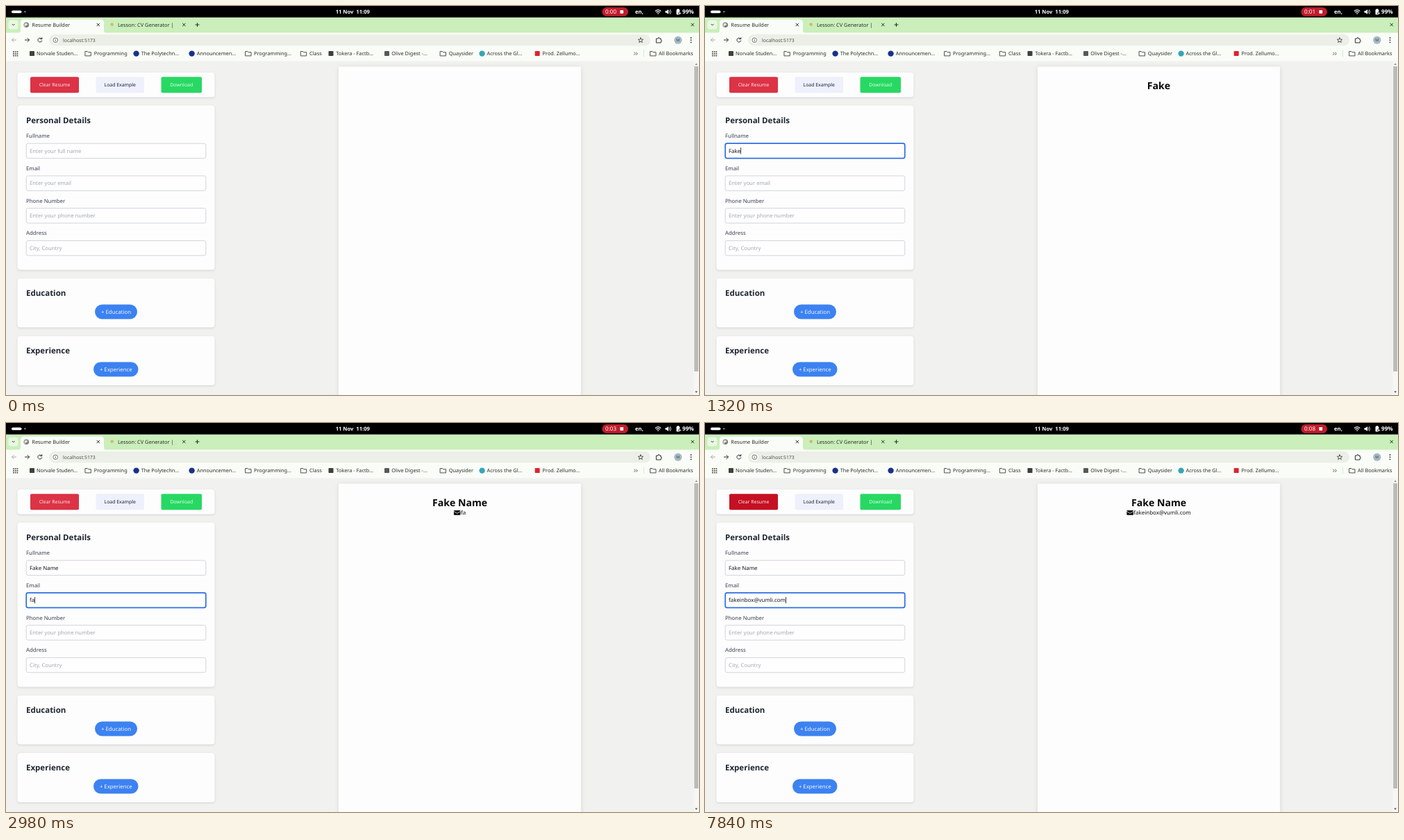
Write an HTML page that moves like this. It is 998 px wide and 561 px high and loops after 8 s.

```html
<!DOCTYPE html>
<html lang="en">
<head>
<meta charset="utf-8">
<title>Resume Builder</title>
<style>
  html, body { margin: 0; width: 100%; height: 100%; overflow: hidden; background: #f1f2f0; }
  svg { display: block; width: 998px; height: 561px; }
  text { font-family: "Noto Sans", sans-serif; white-space: pre; text-rendering: geometricPrecision; }
  .card { filter: drop-shadow(0 1.5px 1.5px rgba(0, 0, 0, .13)); }
  .paper { filter: drop-shadow(0 1px 3px rgba(0, 0, 0, .1)); }
  .line { fill: none; stroke-linecap: round; stroke-linejoin: round; }
</style>
</head>
<body>
<svg id="stage" viewBox="0 0 998 561" xmlns="http://www.w3.org/2000/svg"></svg>
<script>
const LOOP = 8000, BLINK = 600;
const INK = '#2b2f2a', MID = 653.5, FIELD_X = 34;

// ---- markup helpers ----
const rect = (x, y, w, h, fill, r = 0, more = '') =>
  `<rect x="${x}" y="${y}" width="${w}" height="${h}" rx="${r}" fill="${fill}" ${more}/>`;
const dot = (x, y, r, fill, more = '') => `<circle cx="${x}" cy="${y}" r="${r}" fill="${fill}" ${more}/>`;
const ring = (x, y, r, color, w = .9) => dot(x, y, r, 'none', `stroke="${color}" stroke-width="${w}"`);
const path = (d, color = INK, w = 1) => `<path class="line" d="${d}" stroke="${color}" stroke-width="${w}"/>`;
const shape = (d, fill) => `<path d="${d}" fill="${fill}"/>`;
const text = (x, y, size, str, fill = INK, more = '') =>
  `<text x="${x}" y="${y}" font-size="${size}" fill="${fill}" ${more}>${str}</text>`;
const BOLD = 'font-weight="700"', CENTER = 'text-anchor="middle"';
const cross = (x, y, r = 1.9) => path(`M${x - r} ${y - r}l${2 * r} ${2 * r}m0 ${-2 * r}l${-2 * r} ${2 * r}`);
const folder = (x, y = 68.5) => path(`M${x - 4} ${y - 3}h3l1 1.2h4v5.2h-8z`, '#454943', .95);

function systemBar() {
  return rect(0, 0, 998, 16.5, '#000') +
    rect(8, 6.5, 14.5, 3.7, '#fff', 1.85) + dot(27.3, 8.3, 1.3, '#777') +
    text(499.3, 11.2, 7.6, '11 Nov\u00a0 11:09', '#fff', `${BOLD} ${CENTER}`) +
    rect(858.5, 2, 37.5, 12.8, '#c01c2c', 6.4) +
    text(863, 11.2, 8.1, '0:00', '#fff', 'id="timer"') +
    rect(884.4, 6, 4.7, 4.7, '#fff', .5) +
    text(906, 11, 7.8, 'en,', '#fff', BOLD) +
    path('M935.3 7.2q3.8-3 7.6 0M936.9 9q2.2-1.7 4.4 0', '#fff', 1.2) + dot(939.1, 10.8, .9, '#fff') +
    shape('M949.5 7h2l2.3-2.2v7.2l-2.3-2.2h-2z', '#fff') +
    path('M955 6.8q1.1 1.6 0 3.2M956.6 5.4q2.2 3 0 6', '#fff', .9) +
    rect(965.5, 5, 4.8, 7.4, '#fff', .8) + rect(966.8, 4, 2.2, 1.2, '#fff') +
    path('M969 10.5h3M970.5 9v3', '#000', 1.8) + path('M969.2 10.5h2.6M970.5 9.2v2.6', '#fff', .8) +
    text(974, 11.2, 8.1, '99%', '#fff', BOLD);
}

function tabStrip() {
  return rect(0, 16.5, 998, 23, '#caefbb') +
    rect(3.5, 20.5, 14, 13, '#e9f8e2', 3.5) +
    path('M9 26.3l1.6 1.6 1.6-1.6') +
    shape('M17 39q4 0 4-4V24q0-4.500 4.500-4.500H136.500q4.500 0 4.500 4.500v11q0 4 4 4z', '#fafdf7') +
    dot(29.3, 27.2, 3.8, '#7b8079') +
    shape('M26.500 26q2-2 3.500-1t1 2-2 1-1 2q-2-1-1.500-4z', '#dfe3dc') +
    text(37.3, 29.8, 7.4, 'Resume Builder') + cross(132.8, 27) +
    dot(152.7, 26.6, 2.3, '#d8b56e') +
    text(161, 29.8, 7.4, 'Lesson: CV Generator |') + cross(256.3, 27) +
    path('M273 27h5M275.500 24.500v5', INK, 1.1) + cross(988.7, 27);
}

function toolbar() {
  const grid = [0, 1, 2].map(i => [0, 1, 2].map(j =>
    rect(10 + i * 2.8, 65.2 + j * 2.8, 1.7, 1.7, '#454943')).join('')).join('');
  return rect(0, 38.5, 998, 41, '#fafcf7') +
    path('M14.500 49h-6m2.600-2.600L8.500 49l2.600 2.600', '#a9ada6') +
    path('M27.500 49h6m-2.600-2.600l2.600 2.600-2.600 2.600') +
    path('M51.300 47.200a3 3 0 1 0 .5 2.700M51.800 45.600v2h-2') +
    rect(62, 41, 866, 16.3, '#ecefe7', 8.15) + dot(71.3, 49.2, 5.5, '#fafcf7') +
    ring(71.3, 49.2, 3.4, '#50544e', .8) + path('M71.300 49v1.800M71.300 47.300v.1', '#50544e', .8) +
    text(82, 51.9, 6.9, 'localhost:5173', '#4c514a') +
    path('M914 45.800l1 2.300 2.600.2-2 1.700.7 2.500-2.300-1.400-2.300 1.400.7-2.500-2-1.700 2.600-.2z', INK, .8) +
    path('M936.800 47h2.200q0-1.500 1-1.500t1 1.500h2.100v2.200q1.300 0 1.300 1t-1.300 1v1.800h-6.300z', INK, 1) +
    dot(967.8, 49.2, 5.6, '#a4bac3') + text(967.8, 51.2, 5.5, 'M', '#38474d', CENTER) +
    dot(986.5, 46, .9, INK) + dot(986.5, 49.2, .9, INK) + dot(986.5, 52.4, .9, INK) +
    grid + bookmarks() +
    path('M904.800 67l1.700 1.700-1.700 1.700M907.600 67l1.700 1.700-1.700 1.700', INK, .8) +
    path('M918.500 64v9', '#cfe8c4', .8);
}

function bookmarks() {
  const block = (x, c) => rect(x - 3.5, 65, 7, 7, c, .8);
  const disc = (x, c) => dot(x, 68.6, 4.2, c);
  return [
    [block, 37.5, 44, 'Norvale Studen...', '#3f423e'], [folder, 118.3, 126.7, 'Programming'],
    [disc, 187.6, 194.7, 'The Polytechn...', '#17328c'], [disc, 267.6, 274.7, 'Announcemen...', '#17328c'],
    [folder, 349, 357, 'Programming...'], [folder, 428.7, 437, 'Class'],
    [block, 468, 475.3, 'Tokera - Factb...', '#3c3f3b'], [block, 548.5, 555.3, 'Olive Digest -...', '#55595a'],
    [folder, 629.5, 637.8, 'Quaysider'], [disc, 685.6, 692.5, 'Across the Gl...', '#36a5b8'],
    [block, 765.2, 772.6, 'Prod. Zellumo...', '#e0222f'], [folder, 932, 940, 'All Bookmarks']
  ].map(([icon, ix, tx, label, color]) =>
    icon(ix, color && icon !== folder ? color : undefined) + text(tx, 71.2, 7.35, label)).join('');
}

const card = (y, h) => rect(16.5, y, 284, h, '#fdfdfd', 4, 'class="card"');
const title = (y, str) => text(29, y, 11.5, str, '#1f2632', BOLD);
const button = (x, y, w, h, fill, r, size, label, color, id = '') =>
  rect(x, y, w, h, fill, r, id) + text(x + w / 2, y + h / 2 + size * .36, size, label, color, CENTER);

const fields = [
  ['Fullname', 'Enter your full name'], ['Email', 'Enter your email'],
  ['Phone Number', 'Enter your phone number'], ['Address', 'City, Country']
];
const fieldY = i => 198 + i * 46.75;

function field([label, hint], i) {
  const y = fieldY(i);
  return text(29, y - 7.9, 7.85, label, '#374151') +
    rect(29.2, y + .2, 258.6, 21.4, '#fefefe', 2.6, `id="box${i}" stroke="#cdd1d8" stroke-width=".9"`) +
    text(FIELD_X, y + 13.5, 7.75, hint, '#a3a8b1', `id="hint${i}"`) +
    text(FIELD_X, y + 13.5, 7.92, '', '#15181d', `id="value${i}"`);
}

function page() {
  return rect(0, 79.5, 998, 482, '#f1f2f0') +
    rect(479, 87.5, 349, 490, '#fdfdfd', 1, 'class="paper"') +
    card(96, 35.5) +
    button(35, 102.2, 70, 23, '#dc3346', 2, 6.9, 'Clear Resume', '#fbe3e5', 'id="clear"') +
    button(129.5, 102.2, 69.5, 23, '#eef0fc', 2, 6.9, 'Load Example', '#1f2430') +
    button(223.5, 102.2, 58.5, 23, '#27d963', 2, 6.95, 'Download', '#dffbe7') +
    card(143.5, 237) + title(168.6, 'Personal Details') + fields.map(field).join('') +
    card(393, 70.5) + title(418, 'Education') +
    button(128, 430.5, 61, 21, '#3c82f1', 10.5, 7.8, '+ Education', '#f2f7ff') +
    card(476, 71) + title(501, 'Experience') +
    button(126, 513.5, 64.5, 21, '#3c82f1', 10.5, 7.8, '+ Experience', '#f2f7ff') +
    rect(990.5, 79.5, 7.5, 482, '#f6f7f4') + rect(991.2, 87, 5.8, 440, '#b9bbb7', .5) +
    shape('M992.300 85h3.600l-1.800-2.400z', '#8b8d89') + shape('M992.300 555.500h3.600l-1.800 2.400z', '#4c4e4a');
}

function resume() {
  return text(MID, 119.5, 14.1, '', '#080808', `id="head" ${BOLD} ${CENTER}`) +
    `<g id="mail">` + rect(0, 125.9, 9.6, 6.8, '#080808', .9) +
    path('M0 127.400l4.800 2.900 4.800-2.900', '#fdfdfd', .8) +
    text(10, 132, 7.95, '', '#111', 'id="mailText"') + '</g>';
}

function popup() {
  return '<g id="popup">' +
    rect(82, 225, 120.5, 53.5, '#3a4334', 2.5, 'class="card"') + shape('M88 225l4-4 4 4z', '#3a4334') +
    rect(82, 255.7, 120.5, .7, '#7d8578') +
    ring(93, 240.2, 3.1, '#d3d7cf', .9) + dot(93, 239.4, 1.1, '#d3d7cf') +
    shape('M91 242.300q2-2 4 0-2 1.500-4 0z', '#d3d7cf') + dot(93, 267.4, 3.4, '#c3c8bf') +
    text(104, 237.4, 7.7, 'Luong Thi Vang', '#cfd3cb') +
    text(104, 248, 7.1, 'Lamquyen C2718, Dong...', '#cfd3cb') +
    text(104, 270.3, 7.4, 'Manage addresses...', '#cfd3cb') + '</g>';
}

const stage = document.getElementById('stage');
stage.innerHTML = page() + resume() + popup() +
  rect(0, 0, 1, 9.2, '#111', 0, 'id="caret"') + tabStrip() + toolbar() + systemBar();
const $ = id => document.getElementById(id);

// ---- timeline (ms) ----
const inputs = [
  { str: 'Fake Name', focus: 460, blur: 2640,
    keys: [900, 1090, 1200, 1320, 1530, 1670, 1740, 1800, 1870] },
  { str: 'fakeinbox@vumli.com', focus: 2640, blur: LOOP,
    keys: [2900, 2980, 3140, 3230, 4330, 4610, 4720, 4780, 4920, 5140,
           5480, 5560, 5650, 5740, 5900, 6110, 6260, 6340, 6410] }
];
const popups = [
  { dy: 0, open: 520, rise: 160, close: 880, fall: 220 },
  { dy: 46.75, open: 2680, rise: 110, close: 2860, fall: 110 }
];
const clamp = v => Math.max(0, Math.min(1, v));
const show = (el, on) => el.setAttribute('visibility', on ? 'visible' : 'hidden');
const set = (el, attrs) => { for (const k in attrs) el.setAttribute(k, attrs[k]); };

function drawInput({ str, focus, blur, keys }, i, t) {
  const count = keys.filter(k => k <= t).length;
  const typed = str.slice(0, count), value = $('value' + i);
  const active = t >= focus && t < blur;
  value.textContent = typed;
  show($('hint' + i), !count);
  set($('box' + i), active ? { stroke: '#2f6fe3', 'stroke-width': 1.7 } : { stroke: '#cdd1d8', 'stroke-width': .9 });
  if (active) {
    const since = t - (count ? keys[count - 1] : focus);
    const x = FIELD_X + (count ? value.getComputedTextLength() : 0);
    set($('caret'), { x, y: fieldY(i) + 6.2, width: .8 });
    show($('caret'), Math.floor(since / BLINK) % 2 === 0);
  }
  return typed;
}

function draw(t) {
  show($('caret'), false);
  const [name, email] = inputs.map((f, i) => drawInput(f, i, t));
  $('head').textContent = name;
  $('mailText').textContent = email;
  show($('mail'), email);
  const width = email ? $('mailText').getComputedTextLength() + 10 : 0;
  $('mail').setAttribute('transform', `translate(${MID - width / 2} 0)`);

  const p = popups[t < 2000 ? 0 : 1];
  const alpha = clamp((t - p.open) / p.rise) * (1 - clamp((t - p.close) / p.fall));
  set($('popup'), { opacity: alpha, transform: `translate(0 ${p.dy})` });

  $('timer').textContent = '0:0' + Math.floor((t + 160) / 1000);
  $('clear').setAttribute('fill', t >= 7390 ? '#c51022' : '#dc3346');
}

function tick() {
  draw(performance.now() % LOOP);
  requestAnimationFrame(tick);
}
tick();
</script>
</body>
</html>
```
